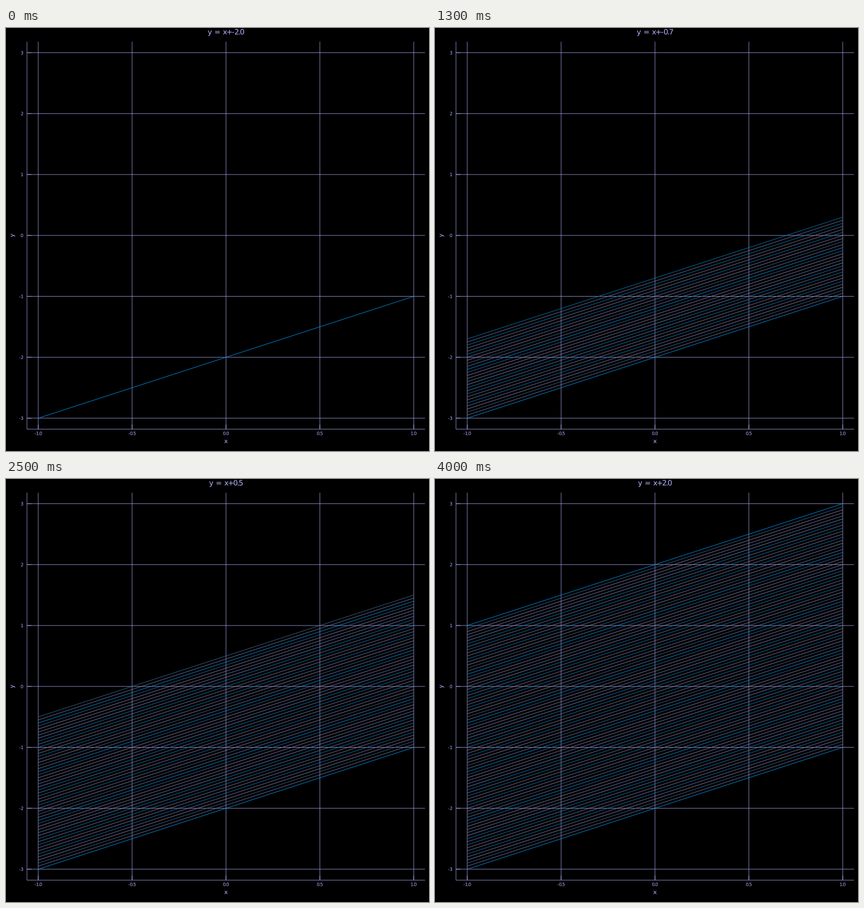
A matplotlib script for the animation above (4050 ms loop, 748x748 px).

```python
import matplotlib.pyplot as plt
from matplotlib.animation import FuncAnimation
from matplotlib.collections import LineCollection
from matplotlib.patches import PathPatch
from matplotlib.textpath import TextPath
from matplotlib.transforms import Affine2D

SIZE, DPI = 748, 100
STEPS, INTERVAL = 81, 50
PX = 72 / DPI  # points per pixel
FG = "#b4b2ff"

BLUE, SEA, STEEL = "#009af9", "#0083c8", "#33709c"
GREY, MAUVE, LAVENDER, PERI = "#7f7a9e", "#857ea8", "#8a86bd", "#5f86c0"
CYCLE = [BLUE, GREY, STEEL, LAVENDER, GREY, SEA, MAUVE, GREY,
         SEA, GREY, SEA, LAVENDER, PERI, MAUVE, LAVENDER, STEEL]

plt.rcParams["font.family"] = "DejaVu Sans"
plt.rcParams["mathtext.fontset"] = "dejavusans"

fig = plt.figure(figsize=(SIZE / DPI, SIZE / DPI), dpi=DPI, facecolor="black")
ax = fig.add_axes([0, 0, 1, 1])
ax.set_xlim(0, SIZE)
ax.set_ylim(SIZE, 0)
ax.axis("off")


def to_x(x):
    return 389 + 332 * x


def to_y(y):
    return 366.8 - 107.72 * y


LEFT, RIGHT = to_x(-1.06), to_x(1.06)
TOP, BOTTOM = to_y(3.18), to_y(-3.18)


def tight(text):
    """Kern the plus sign and the decimal point closer to their neighbours."""
    kern = r"$\hspace{-0.11}$"
    return "".join(kern + c + kern if c in "+." else c for c in text)


def outline(x, y, text, px, align=0.5, angle=0):
    """Glyph outlines with the baseline at y and the ink aligned on x."""
    path = TextPath((0, 0), tight(text), size=px)
    box = path.get_extents()
    shift = Affine2D().translate(-box.x0 - align * box.width, 0)
    return path.transformed(
        shift.scale(1, -1).rotate_deg(-angle).translate(x, y))


def label(*args, **kw):
    patch = PathPatch(outline(*args, **kw), facecolor=FG, linewidth=0,
                      snap=False)
    return ax.add_patch(patch)


def segments(segs, color, alpha):
    lines = LineCollection(segs, colors=color, linewidths=PX, alpha=alpha,
                           capstyle="butt", snap=False)
    return ax.add_collection(lines, autolim=False)


x_ticks = [-1.0, -0.5, 0.0, 0.5, 1.0]
y_ticks = range(-3, 4)

grid = [[(to_x(v), TOP), (to_x(v), BOTTOM)] for v in x_ticks]
grid += [[(LEFT, to_y(v)), (RIGHT, to_y(v))] for v in y_ticks]
segments(grid, FG, 0.72)

frame = [[(LEFT, TOP), (LEFT, BOTTOM)], [(LEFT, BOTTOM), (RIGHT, BOTTOM)]]
frame += [[(to_x(v), BOTTOM), (to_x(v), BOTTOM - 8)] for v in x_ticks]
frame += [[(LEFT, to_y(v)), (LEFT + 8, to_y(v))] for v in y_ticks]
segments(frame, FG, 0.72)

for v in x_ticks:
    label(to_x(v), 719.7, f"{v:.1f}", 8)
for v in y_ticks:
    label(30.3, to_y(v) + 3, str(v), 8, align=1)
label(to_x(0), 734, "x", 10.5)
label(14, to_y(0), "y", 10.5, angle=90)
title = label(to_x(0), 11.5, "y", 13)

shifts = [-2 + 0.05 * k for k in range(STEPS)]
paths = [[(to_x(-1), to_y(b - 1)), (to_x(1), to_y(b + 1))] for b in shifts]
colors = [CYCLE[k % len(CYCLE)] for k in range(STEPS)]
family = segments([], BLUE, 0.8)


def update(i):
    family.set_segments(paths[:i + 1])
    family.set_color(colors[:i + 1])
    shift = round(shifts[i], 2) + 0.0
    title.set_path(outline(to_x(0), 11.5, f"y = x+{shift}", 13))
    return family, title


anim = FuncAnimation(fig, update, frames=STEPS, interval=INTERVAL,
                     repeat=True, repeat_delay=0, blit=False)
plt.show()
```
